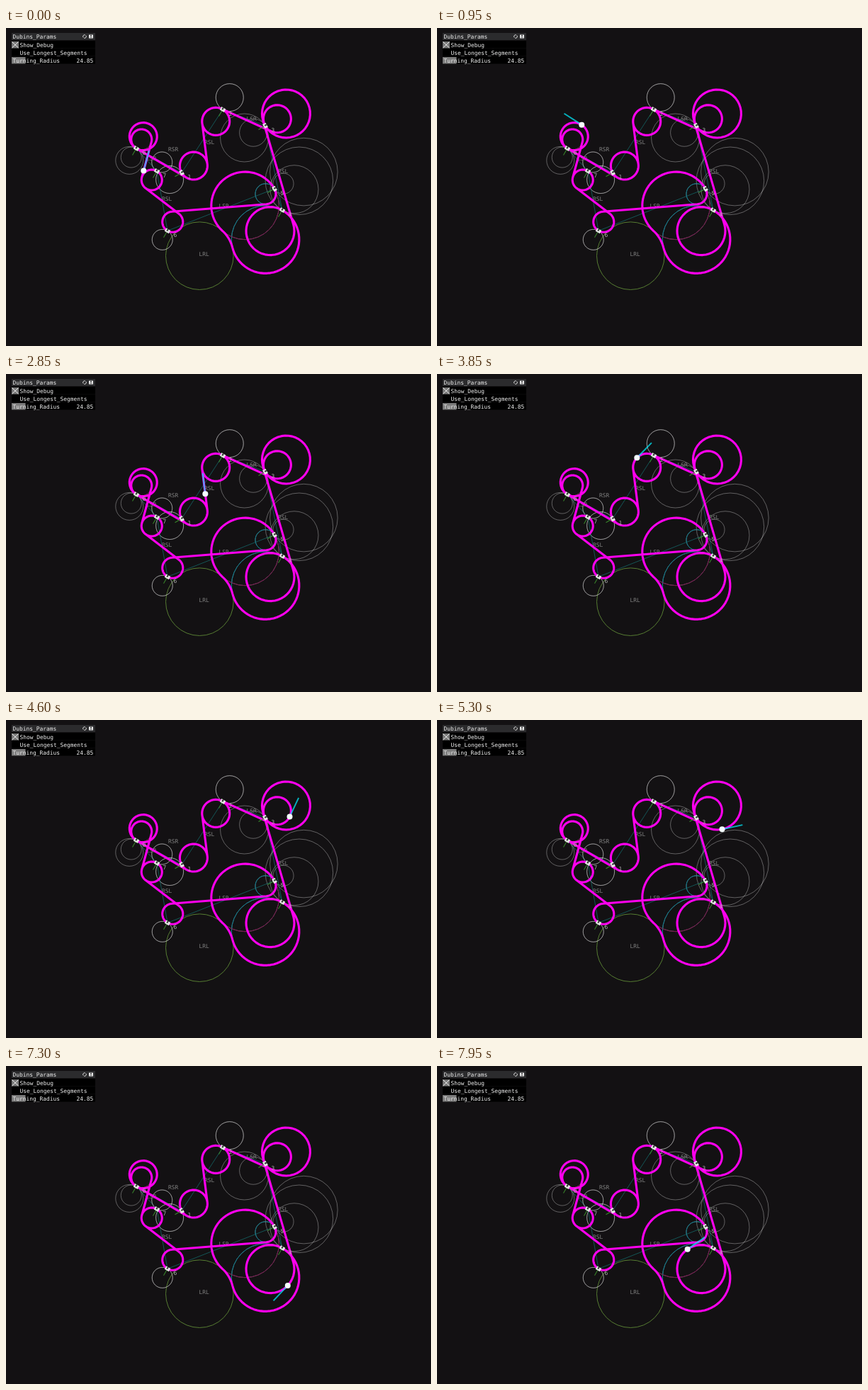
An HTML page with a canvas for the animation above (8000 ms loop, 600x449 px).

```html
<!DOCTYPE html>
<html>
<head>
<meta charset="utf-8">
<style>
html, body { margin: 0; width: 100%; height: 100%; overflow: hidden; background: #131113; }
canvas { display: block; }
</style>
</head>
<body>
<canvas id="stage" width="600" height="449"></canvas>
<script>
const ctx = document.getElementById('stage').getContext('2d');
const TAU = 2 * Math.PI, LOOP = 8000, STEP = 50;
const SPEED = 0.1754;        // pixels per ms
const START_BEFORE = 106.3;  // path length left before waypoint 0 at time zero
const { sin, cos, atan2, asin, acos, hypot, sqrt } = Math;

// Heading is in degrees, clockwise on screen.
const waypoints = [
  [184, 170, 30], [248, 204.3, 60], [306, 115, 30], [366, 138, 60],
  [390, 257.2, 30], [379, 227, 60], [228, 286.3, 30], [213, 202, 30]
].map(([x, y, deg]) => ({ x, y, h: deg * TAU / 360 }));

// One leg per waypoint: turns on screen, radius, label and its place.
const legs = [
  ['LSL', 19.5, 'RSR', 229, 173.5], ['LSR', 19.5, 'RSL', 280, 163.5],
  ['RSL', 19.5, 'LSR', 339.5, 130.5], ['LSR', 34, 'RSL', 384, 205],
  ['RLR', 47.8, 'LRL', 272.5, 321.5], ['RSL', 14.5, 'LSR', 300.5, 253.5],
  ['LSR', 14.5, 'RSL', 220, 243.5], ['RSL', 14.5, 'LSR', 198, 187]
].map(([turns, r, label, x, y], i) =>
  ({ turns, r, label, x, y, from: waypoints[i], to: waypoints[(i + 1) % 8] }));

const side = turn => turn === 'R' ? 1 : -1;
const sweep = (a, b, s) => (((b - a) * s) % TAU + TAU) % TAU;
const center = (p, s, r) => ({ x: p.x - s * r * sin(p.h), y: p.y + s * r * cos(p.h) });

function arc(c, s, r, h0, h1) {
  const at = d => {
    const h = h0 + s * d / r;
    return { x: c.x + s * r * sin(h), y: c.y - s * r * cos(h), h };
  };
  return { length: r * sweep(h0, h1, s), at, steps: 40 };
}

function line(p, h, length) {
  return { length, steps: 1, at: d => ({ x: p.x + d * cos(h), y: p.y + d * sin(h), h }) };
}

function buildLeg(leg) {
  const { turns, r, from, to } = leg;
  const s1 = side(turns[0]), s2 = side(turns[2]);
  const c1 = leg.c1 = center(from, s1, r), c2 = leg.c2 = center(to, s2, r);
  const d = hypot(c2.x - c1.x, c2.y - c1.y);
  const a = atan2(c2.y - c1.y, c2.x - c1.x);
  if (turns[1] === 'S') {
    const gap = r * (s1 - s2), h = a + asin(gap / d);
    const first = arc(c1, s1, r, from.h, h);
    return [first, line(first.at(first.length), h, sqrt(d * d - gap * gap)), arc(c2, s2, r, h, to.h)];
  }
  const toMid = a - s1 * acos(d / (4 * r));
  const mid = leg.mid = { x: c1.x + 2 * r * cos(toMid), y: c1.y + 2 * r * sin(toMid) };
  const h1 = toMid + s1 * TAU / 4;
  const h2 = atan2(mid.y - c2.y, mid.x - c2.x) + s2 * TAU / 4;
  return [arc(c1, s1, r, from.h, h1), arc(mid, -s1, r, h1, h2), arc(c2, s2, r, h2, to.h)];
}

const pieces = legs.flatMap(buildLeg);
const total = pieces.reduce((sum, p) => sum + p.length, 0);

function poseAt(distance) {
  let d = distance % total;
  for (const p of pieces) {
    if (d <= p.length) return p.at(d);
    d -= p.length;
  }
  return pieces[0].at(0);
}

function stroke(points, color, width = 1, close = false) {
  ctx.beginPath();
  points.forEach(p => ctx.lineTo(p.x, p.y));
  if (close) ctx.closePath();
  ctx.strokeStyle = color;
  ctx.lineWidth = width;
  ctx.stroke();
}

function ring(c, r, color) {
  const points = Array.from({ length: 32 }, (_, i) =>
    ({ x: c.x + r * cos(i * TAU / 32), y: c.y + r * sin(i * TAU / 32) }));
  stroke(points, color, 1, true);
}

function rect(x, y, w, h, color) {
  ctx.fillStyle = color;
  ctx.fillRect(x, y, w, h);
}

function text(str, x, y, color = '#f0f0f0') {
  ctx.font = '7.9px "DejaVu Sans Mono", "Liberation Mono", monospace';
  ctx.fillStyle = color;
  ctx.fillText(str, x, y);
}

function drawDebug() {
  for (const { r, from, to, c1, c2, mid } of legs) {
    stroke([from, to], 'rgba(20,130,130,.6)');
    for (const p of [from, to])
      for (const s of [-1, 1]) ring(center(p, s, r), r, 'rgba(255,255,255,.33)');
    ring(c1, r, '#087f92');
    ring(c2, r, '#7a1650');
    if (mid) ring(mid, r, '#567c32');
  }
  legs.forEach(l => text(l.label, l.x, l.y, '#808080'));
}

function drawMarker({ x, y, h }, i) {
  ctx.save();
  ctx.translate(x, y);
  ctx.rotate(h);
  stroke([{ x: 0, y: 0 }, { x: 0, y: 11 }], '#3a8a2c');
  rect(-3.5, -2.5, 7, 5, '#e4e4e4');
  rect(-1.5, -2.5, 2, 3, '#333');
  ctx.restore();
  text(i, x + 8.5, y + 9, '#b0b0b0');
}

function drawPanel() {
  rect(8, 7, 118, 10, '#2b2b2d');
  for (const y of [18, 29, 40]) rect(8, y, 118, 10.5, '#000');
  rect(8, 19, 10, 9.5, '#777');
  stroke([{ x: 8.5, y: 19.5 }, { x: 17.5, y: 28 }], '#eee');
  stroke([{ x: 17.5, y: 19.5 }, { x: 8.5, y: 28 }], '#eee');
  rect(8, 41, 19.5, 9.5, '#7b7b7b');
  text('Dubins_Params', 9.5, 14.5);
  text('Show_Debug', 19.5, 26.5);
  text('Use_Longest_Segments', 19.5, 37.5);
  text('Turning_Radius', 9.5, 48.5);
  text('24.85', 99.5, 48.5);
  ctx.strokeStyle = '#eee';
  for (const a of [-0.6, 2.54]) {
    ctx.beginPath();
    ctx.arc(111, 12, 2.3, a, a + 2.5);
    ctx.stroke();
  }
  rect(117, 9.5, 6, 5, '#eee');
  rect(119, 10, 2, 1.5, '#444');
  rect(118.5, 12.5, 3, 1, '#444');
}

function drawPath() {
  const points = pieces.flatMap(p =>
    Array.from({ length: p.steps + 1 }, (_, i) => p.at(p.length * i / p.steps)));
  ctx.lineJoin = 'round';
  stroke(points, '#f0e', 3.1);
}

function drawHead(t) {
  const p = poseAt(total - START_BEFORE + SPEED * t);
  const tip = { x: p.x + 29.5 * cos(p.h), y: p.y + 29.5 * sin(p.h) };
  stroke([p, tip], 'rgba(0,240,255,.72)', 2);
  ctx.beginPath();
  ctx.arc(p.x, p.y, 4, 0, TAU);
  ctx.fillStyle = '#f4ffff';
  ctx.fill();
}

function draw(now) {
  const t = Math.floor((now % LOOP) / STEP) * STEP;
  rect(0, 0, 600, 449, '#131113');
  drawDebug();
  drawPath();
  waypoints.forEach(drawMarker);
  drawHead(t);
  drawPanel();
}

const startTime = performance.now();
function frame() {
  draw(performance.now() - startTime);
  requestAnimationFrame(frame);
}
frame();
</script>
</body>
</html>
```
